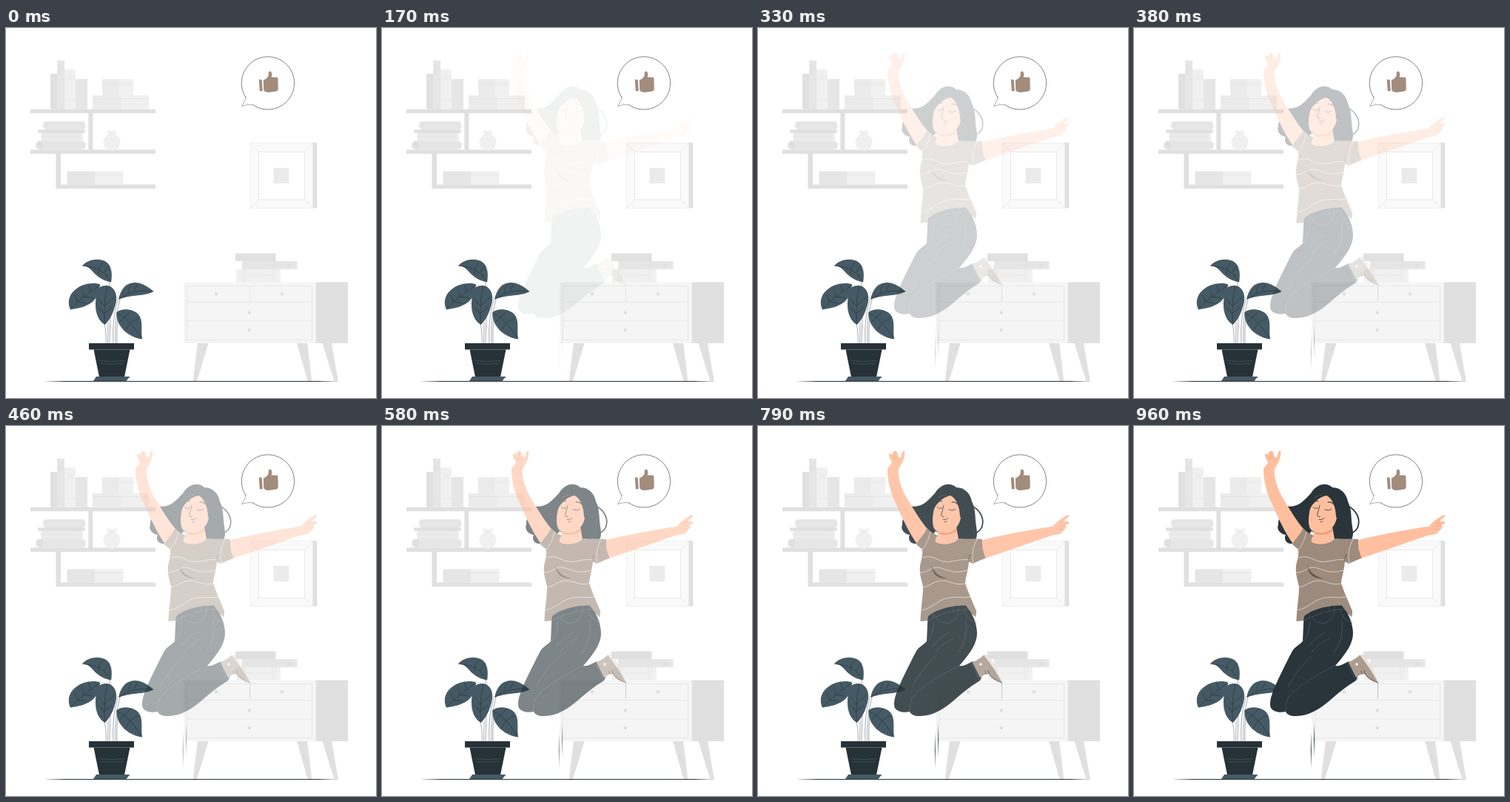
Recreate the animation shown at these times as an HTML page. Size 500 by 500 pixels, loop 1000 ms.

```html
<!DOCTYPE html>
<html lang="en">
<head>
<meta charset="utf-8">
<title>Jump</title>
<style>
  html, body { margin: 0; width: 100%; height: 100%; overflow: hidden; background: #fff; }
  svg { display: block; width: 100vw; height: 100vh; }
  .a { fill: #e0e0e0; } .b { fill: #e6e6e6; } .c { fill: #ebebeb; }
  .d { fill: #f0f0f0; } .e { fill: #f5f5f5; }
  .line { fill: none; stroke: #e0e0e0; stroke-width: .6; }
  .dark { fill: #263238; } .leaf { fill: #455a64; }
  .ink { fill: none; stroke: #263238; stroke-width: .6; stroke-linecap: round; }
  .thin { stroke-width: .4; }
  .seam { fill: none; stroke: #455a64; stroke-width: .7; stroke-linecap: round; }
  .skin { fill: #ffbe9d; } .shade { fill: #eb996e; }
  .fold { fill: none; stroke: #eb996e; stroke-width: .6; }
  .tan { fill: #9c8a7b; } .stripe { fill: none; stroke: #ece6e1; stroke-width: .7; }
</style>
</head>
<body>
<svg viewBox="0 0 500 500">
  <g id="shelf">
    <path class="a" d="M33 109.700h169v5.600H33zM33 164.500h169v5.600H33zM67.500 211.400H202v5.600H67.500zM111.400 115h6v50h-6zM67.500 170H74v42h-6.500z"/>
    <path class="a" d="M60 62h9.500v47.700H60z"/>
    <path class="b" d="M69 44h10v65.700H69z"/>
    <path class="d" d="M79 56h15v53.700H79z"/>
    <path class="b" d="M94 69h16v40.700H94z"/>
    <circle class="a" cx="74" cy="55" r="2.500"/>
    <path class="line" d="M69 50h10M69 97h10M82 66h9M84 69h5M79 98h15"/>
    <path class="c" d="M130 69h22v22h-22zM117 91h38v18.700h-38z"/>
    <path class="d" d="M152 69h20v22h-20zM155 91h38v18.700h-38z"/>
    <path class="line" d="M130 76h42M117 95.500h76"/>
    <rect class="b" x="50" y="126" width="57.500" height="11.500" rx="5"/>
    <rect class="a" x="43" y="137.300" width="64" height="4.800" rx="2"/>
    <rect class="c" x="47" y="142" width="57" height="10.500" rx="4"/>
    <rect class="b" x="40" y="152.300" width="68" height="12.200" rx="6"/>
    <circle class="a" cx="46" cy="158.500" r="5"/>
    <path class="line" d="M50 147h48M54 156h50"/>
    <path class="d" d="M135 140q3-3 6-1h5q4-1 4 2l-3 2.500a11.500 11.500 0 1 1-8 0z"/>
    <path class="line" d="M139 143.500h9"/>
    <path class="b" d="M82.500 193.500H120v17.900H82.500z"/>
    <path class="d" d="M120 193.500h38.500v17.900H120z"/>
    <path class="line" d="M82.500 198.500h76"/>
  </g>

  <g id="frame">
    <path class="a" d="M414.500 155h6v88.500h-6z"/>
    <path d="M330.500 155.500h84v88h-84z" fill="#fafafa" stroke="#ebebeb" stroke-width=".7"/>
    <path d="M341.500 167.500h62v64.500h-62z" fill="#fff" stroke="#e0e0e0" stroke-width=".7"/>
    <path class="line" d="M330.500 155.500l11 12M414.500 155.500l-11 12M330.500 243.500l11-11.500M414.500 243.500l-11-11.500"/>
    <path class="c" d="M361.500 189h21v21h-21z"/>
  </g>

  <g id="bubble">
    <path class="ink" d="M324 94A35.700 35.700 0 1 1 333.500 103.800"/>
    <path class="ink thin" d="M333.500 103.800Q327 102.500 318.500 105.500Q322.500 101 324 94"/>
    <path fill="#a28d7d" d="M341.800 69.500l4 .3 1 15.200-4 .5zM347.800 70.500C352 69 355.500 66 354.800 60q1.800-2.500 3.700-.5c1.500 3 1 5 0 7h6.500q3 0 2.500 3l.3 12.500q0 3.500-4 3.800L355 87Q351 87 348.300 84.500z"/>
  </g>

  <g id="cabinet">
    <path class="a" d="M310 304.500h54.500V315H310z"/>
    <path class="b" d="M319 315h74.500v11H319z"/>
    <path class="d" d="M311 326h60v17.500h-60z"/>
    <circle class="a" cx="382.500" cy="321" r="3"/>
    <path class="line" d="M324 320.500h52M319 326v17M323 326v17M360 326v17M364 326v17M327 334h30"/>
    <path class="a" d="M259 426h14.500L258 477.500h-5.500zM393 426h14.300l6 51.500h-5.500zM427.500 426h12.500l9 51.500h-5.500zM418.500 343.500H462V426h-43.500z"/>
    <path class="e" d="M240 343.500h178.500V426H240z"/>
    <path class="line" d="M244.500 348.500h169v73h-169zM244.500 370.500h169M244.500 396h169M329.500 348.500v22"/>
    <g class="a">
      <circle cx="284" cy="359.300" r="2.300"/><circle cx="373" cy="359.300" r="2.300"/>
      <circle cx="328.800" cy="384.500" r="2.300"/><circle cx="328.800" cy="408" r="2.300"/>
    </g>
  </g>

  <path class="dark" d="M50 477.400L80 477.100H420L450 477.400V477.600L420 477.900H80L50 477.600z"/>

  <g id="plant">
    <path class="ink thin" d="M140 343Q142 385 140 426M133 400Q136 412 135 426M138 399Q138 412 137.500 426M151 367Q143 395 145 426M154 367Q146 395 148 426M151 392Q149 410 150 426"/>
    <g class="leaf">
      <path d="M103 321.500C110 312.500 127 310 136 316.500C143 322 144 333 142 343.500C133 342 124 337 118 330C113 324 109 321.500 103 321.500z"/>
      <path d="M127 346.500C117 343 102 346 93 354C84 362 83 372 87 380.500C98 379 112 376 119 368C125 361 126 354 127 346.500z"/>
      <path d="M127 350Q133 346.500 141 349C150 355 151 366 147 377C144 387 140 395 133.500 401C125 396 121 385 121 375C121 364 122 354 127 350z"/>
      <path d="M152 367C155 353 162 344 174 344C184 344 192 350 199.500 356C190 361 180 361 172 362C163 363 157 365 152 367z"/>
      <path d="M149.500 384C156 378 172 379 179 387C186 396 182 408 184 420.500C172 419 160 412 154 402C150 395 149 389 149.500 384z"/>
    </g>
    <path class="ink" d="M104 321.500Q130 322 142 342M126 325l5-9M133 330l6-9M126 325l-1 7M88 379Q104 362 127 348M97 370l-4-9M105 363l-3-12M114 356l-2-9M97 370l11 2M105 363l13 2M133.500 399Q131 372 137 349M132.600 386l-8-9M132.600 375l-8-9M132.600 386l10-8M133 375l13-11M153 366Q172 352 198 356M165 358l3-10M173 355l4-8M150 385Q170 396 183 419M160 391l9-9M168 398l11-6M160 391l-6 6M168 398l-6 10"/>
    <path class="dark" d="M118.500 434.500h49L160 471.500h-34z"/>
    <path class="dark" d="M112 426h61v8.500h-61z"/>
    <path class="leaf" d="M122 471h42l3.500 0-5 6H118z"/>
    <path class="seam" d="M126 449.500Q143 452 160 449.500M128 453.500Q143 455 158 453.500"/>
  </g>

  <g id="girl">
    <path class="dark" d="M239.300 414l.5 24-.5 25-.5-25zM243.500 402l.5 22-.5 24-.5-24z"/>
    <path class="ink" opacity=".35" d="M329.500 346v22"/>

    <path class="dark" d="M239 91C246 79 259 75 268 83C280 83 287 92 289 102C293 110 293.500 118 294 128C295 139 298 147 294 153L262 154L240 142C234 151 222 159 212 159C206 159 202 153 205 147C198 146 192 140 195 133C194 126 201 118 204 108C222 112 230 100 239 91z"/>
    <path d="M289 108C299 113 305 123 303.500 132C303 139 299 142 294 145" fill="none" stroke="#263238" stroke-width="1.800"/>

    <path class="skin" d="M175 58C178 53 181 51 181 48C178 45 176 40 177 38Q179 36 181.500 39Q181 35 184 34.500Q186 32 188.500 36L189.500 41L192.500 43.500L195 35Q197 32.500 198.500 35C198 41 197 47 194 51L189.500 59C190 75 195 88 204 102C212 115 220 129 230 140L216 161C205 146 195 125 186 104C178 88 175 72 175 58z"/>
    <path class="fold" d="M181.500 39l2 5M184.500 35.500l2 7M188 43q-5 0-6 4M192.500 43.500q-2 3-4 4"/>
    <path class="skin" d="M300 155C330 147 365 141 399 135.500C402 130 410 125 417 120.500Q421 119.500 420.500 122L413 128.500L420 129.500Q421.500 131 419 132.500L415 134Q418 136 416 138L411 143.500C408 147 404 147 400 147C372 156 340 168 303 180z"/>
    <path class="fold" d="M413 128.500l-6 4M415 134l-8 2M412 139l-5 1"/>

    <path class="skin" d="M245 136L242 150L238 157C246 163 262 161 271 153L268 136z"/>
    <path class="shade" d="M245 142.500C252 146 262 145 268 138V142C262 147 250 148 244.500 145.500z"/>
    <path class="skin" d="M245 96C239 104 236 117 236 128C236 139 240 144 250 144C262 144 270 138 273 128C276 119 275 107 268 99C261 92 251 92 245 96z"/>
    <path class="dark" d="M238 112C238 99 246 91 262 93.500C253 95 243 101 238 112zM258 92.500C267 96 273 108 273 124C280 118 281 102 272 93z"/>
    <g class="ink">
      <path d="M242.500 104Q245 100.500 248.500 101.500M262 103Q267 102 270 106" stroke-width="1.100"/>
      <path d="M242 109.500Q245 113 248.500 110.500M258 113Q262 115.500 267 112.500M251 107L247.500 121Q249 123 251.500 122.500M250 126.500Q253 128 257 124.500M252 129.500Q253.500 130.500 255 129" stroke-width=".8"/>
    </g>

    <path fill="#7d6e62" d="M220 263.500L231 262L281 246L294 258L295 250L270 238L230 250z"/>
    <path class="dark" d="M229.500 256C244 246 262 242 281 242C290 252 296 268 296 280C296 293 288 306 272 324C279 325 285 320 291 318L302 340L300 344C285 353 275 362 262 373C250 383 235 392 219 392C211 392 207 390 205 386C196 388 187 386 184.500 380C182 370 189 355 195 342C203 326 208 315 214 304C217 299 223 296 228 291z"/>
    <path class="seam" d="M230 263Q255 249 282 247.500M237 253v7M264 243.500v6M271 242.500v6M241 258Q245 268 258 266Q268 264 271 250M279 248Q281 262 295 266M281 262Q284 290 270 306M229 290Q236 285 238 264M258 279Q246 285 236 298M264 287Q250 293 240 306M272 324C250 335 230 345 211 363Q204 372 205 386M240 311Q222 326 208 353M289 322Q294 330 298 342"/>

    <path class="tan" d="M228.500 138C234 144 240 147 243 148C240 152 239 155 240 157C250 162 264 160 272 152C284 153 294 152 303 153Q302 166 307.500 178.500L290 186L285 183C284 195 281 203 280 212C284 226 291 239 295 250L294 258C289 253 284 248 281 242.500C262 242 240 248 230 257L229 263L219.500 264C220 245 223 232 223 217C220 205 217 195 220 184C223 175 222 170 222 167L214 160C217 153 224 148 228.500 138z"/>
    <path class="stripe" d="M223 178C236 173 244 184 256 183.500C267 183 275 179 286 181M219 198C228 199 234 190 243 191C255 193 264 201 283 195M222 218C232 217 238 209 248 209C259 209 266 216 281 213M221 249C236 246 243 235 256 232.500C268 230 276 233 287 231M222 167Q230 158 233 143M291 185Q287 170 296 153"/>
    <path d="M234 189C236 202 245 207 256 206C247 204 238 199 234 189z" fill="#5c5049"/>
    <path class="ink" d="M285 183Q284 178 287 174"/>

    <path fill="#ab9b8d" d="M289.500 319C296 317 301 313 305 309.500L309 309L330 347C321 345 315 341 312 335L306 336L300 340z"/>
    <path fill="#e8e2dc" d="M305 309.500L309 308.500C318 318 326 333 330 347C324 336 317 325 305 309.500z"/>
    <circle cx="301" cy="322" r="1.700" fill="#fff"/>
    <path class="ink" d="M312 335l-1-5M308 335l-1-4M312 335Q318 343 330 347"/>
  </g>
</svg>
<script>
  const girl = document.getElementById('girl');
  const loop = 1000, fade = 1035;
  const steps = [170, 250, 330, 380, 460, 500, 540, 580, 630, 670, 710, 750, 790, 830, 880, 920, 960];
  const ease = t => (1 - Math.cos(Math.PI * t)) / 2;

  function draw(now) {
    const t = now % loop;
    const at = steps.filter(s => s <= t).pop() || 0;
    girl.setAttribute('opacity', ease(at / fade));
    requestAnimationFrame(draw);
  }
  draw(0);
</script>
</body>
</html>
```
